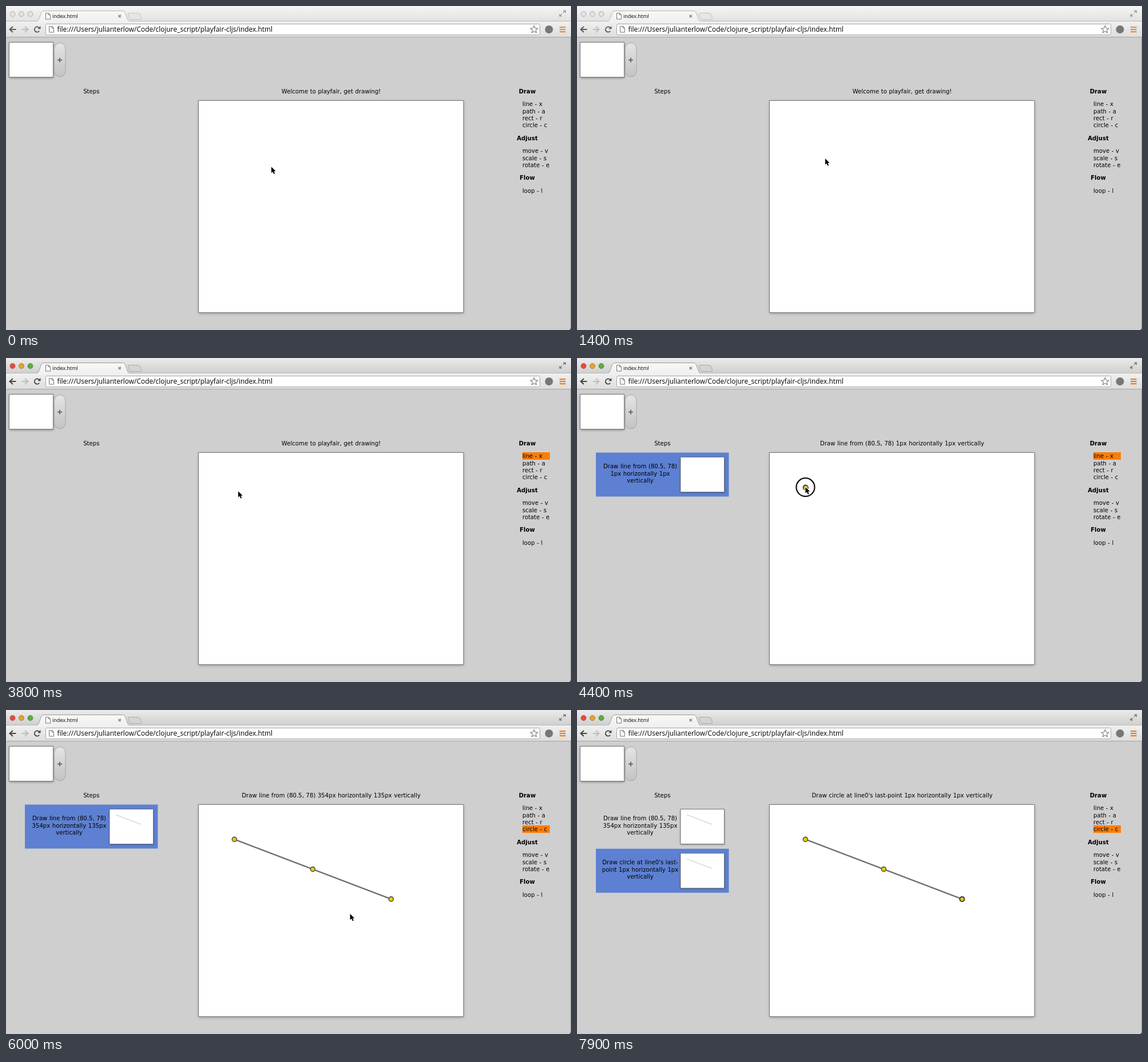
Write an HTML page with a canvas that moves like this. It is 988 by 567 pixels and loops after 8 s.

```html
<!DOCTYPE html>
<html lang="en">
<head>
<meta charset="utf-8">
<title>Drawing tool</title>
<style>
  html, body { margin: 0; width: 100%; height: 100%; overflow: hidden; background: #cfcfcf; }
  canvas { display: block; width: 988px; height: 567px; }
</style>
</head>
<body>
<canvas id="stage" width="988" height="567"></canvas>
<script>
const ctx = document.getElementById('stage').getContext('2d');
const W = 988, H = 567, LOOP = 8000, STEP = 100;
const UI = '"Open Sans", "Noto Sans", sans-serif';
const BODY = '10.15px "DejaVu Sans", sans-serif';

// Event times in ms
const ACTIVATE = 3300, LINE_KEY = 3700, PRESS = 4300, RELEASE = 4900,
      CIRCLE_KEY = 5900, CLICK = 7500, CIRCLE = 7600, CLICK_END = 7800;

const SCALE = 0.774;
const START = [399.4, 226.4];
const SPAN = [354, 135];

// Pointer path: time, x, y
const PATH = [
  [0, 464, 281.5], [100, 468, 260], [300, 468, 176], [400, 470, 182], [600, 464, 272],
  [700, 468.5, 291.5], [800, 480, 265], [1000, 517, 183], [1200, 497, 226],
  [1400, 434, 267], [1500, 411, 238.5], [3500, 411, 238.5], [4200, 399.5, 226],
  [4400, 399.5, 226], [4500, 427, 237], [4600, 523, 274], [4700, 632, 315],
  [4800, 673.4, 331], [5000, 610, 349], [5100, 563, 355], [5300, 559, 360],
  [5500, 584, 360], [5800, 584, 360], [6400, 637, 350], [6600, 666, 331.5],
  [6800, 666, 331.5], [7400, 673, 331]
];

function pointer(t) {
  const i = PATH.findIndex(k => k[0] > t);
  if (i < 0) return PATH[PATH.length - 1].slice(1);
  const [t0, x0, y0] = PATH[i - 1], [t1, x1, y1] = PATH[i];
  const p = (t - t0) / (t1 - t0);
  return [x0 + (x1 - x0) * p, y0 + (y1 - y0) * p];
}

function fade(y0, y1, top, bottom) {
  const g = ctx.createLinearGradient(0, y0, 0, y1);
  g.addColorStop(0, top);
  g.addColorStop(1, bottom);
  return g;
}

function box(x, y, w, h, fill) {
  ctx.fillStyle = fill;
  ctx.fillRect(x, y, w, h);
}

function poly(points, fill, stroke, width = 1, close = true) {
  ctx.beginPath();
  points.forEach(([x, y]) => ctx.lineTo(x, y));
  if (close) ctx.closePath();
  paint(fill, stroke, width);
}

function disc(x, y, r, fill, stroke, width = 1) {
  ctx.beginPath();
  ctx.arc(x, y, r, 0, Math.PI * 2);
  paint(fill, stroke, width);
}

function paint(fill, stroke, width) {
  if (fill) { ctx.fillStyle = fill; ctx.fill(); }
  if (stroke) { ctx.strokeStyle = stroke; ctx.lineWidth = width; ctx.stroke(); }
}

function line(x0, y0, x1, y1, color, width = 1) {
  poly([[x0, y0], [x1, y1]], null, color, width, false);
}

function text(str, x, y, align = 'left', font = BODY) {
  ctx.font = font;
  ctx.wordSpacing = '0.35px';
  ctx.textAlign = align;
  ctx.fillStyle = '#000';
  ctx.fillText(str, x, y);
}

function sheet(x, y, w, h, blur = 3) {
  ctx.save();
  ctx.shadowColor = 'rgba(0,0,0,.4)';
  ctx.shadowBlur = blur;
  ctx.shadowOffsetY = 1;
  box(x, y, w, h, '#fff');
  ctx.restore();
  ctx.strokeStyle = '#777';
  ctx.lineWidth = 1;
  ctx.strokeRect(x, y, w, h);
}

function pageIcon(x, y) {
  poly([[x, y], [x + 5, y], [x + 8, y + 3], [x + 8, y + 10.5], [x, y + 10.5]], '#fafafa', '#777');
  poly([[x + 5, y], [x + 5, y + 3], [x + 8, y + 3]], null, '#777', 1, false);
}

function arrow(x, dir, color) {
  line(x, 41, x + dir * 11, 41, color, 2);
  poly([[x + dir * 5.5, 36], [x, 41], [x + dir * 5.5, 46]], null, color, 2, false);
}

function star(x, y) {
  const pts = Array.from({ length: 10 }, (_, i) => {
    const a = i * Math.PI / 5 - Math.PI / 2, r = i % 2 ? 3.1 : 6.8;
    return [x + r * Math.cos(a), y + r * Math.sin(a)];
  });
  poly(pts, '#fff', '#777', 1.1);
}

function tabStrip(active) {
  box(0, 0, W, 28, active ? fade(0, 27, '#ebebeb', '#cfcfcf') : fade(0, 27, '#f5f5f5', '#e1e1e1'));
  const lights = active ? ['#e8493d', '#e5a62f', '#5caf3e'] : ['#e4e4e4', '#e4e4e4', '#e4e4e4'];
  const rims = active ? ['#a8443c', '#a47c2e', '#4a7c38'] : ['#aaa', '#aaa', '#aaa'];
  lights.forEach((c, i) => disc(11.5 + i * 15.5, 14, 4.4, c, rims[i]));

  poly([[215, 12.5], [231, 12.5], [234, 14], [237, 22], [235, 23.5], [219, 23.5], [216, 21.5], [213, 14]],
    active ? '#d4d4d4' : '#e6e6e6', active ? '#aaa' : '#c2c2c2');

  ctx.beginPath();
  ctx.moveTo(53, 27);
  ctx.bezierCurveTo(60, 26, 59, 8.5, 66, 8.5);
  ctx.lineTo(204, 8.5);
  ctx.bezierCurveTo(211, 8.5, 210, 26, 217, 27);
  paint(fade(8, 27, '#f8f8f8', '#f0f0f0'), active ? '#9b9b9b' : '#b5b5b5', 1);
  pageIcon(69.5, 12.5);
  text('index.html', 81, 21, 'left', '9px ' + UI);
  line(196.5, 15.5, 201, 20, '#777', 1.2);
  line(201, 15.5, 196.5, 20, '#777', 1.2);

  const c = active ? '#777' : '#999';
  line(974, 12, 977, 9, c, 1.3);
  line(972, 14, 969, 17, c, 1.3);
  poly([[974, 7.5], [979, 7.5], [979, 12.5]], c);
  poly([[967.5, 13.5], [967.5, 18.5], [972.5, 18.5]], c);
}

function toolbar(active) {
  const ink = active ? '#444' : '#5c5c5c';
  box(0, 27, W, 28, fade(27, 54, '#f0f0f0', '#dedede'));
  line(0, 26.5, 54, 26.5, '#b9b9b9');
  line(216, 26.5, W, 26.5, '#b9b9b9');
  line(0, 54.5, W, 54.5, '#a2a2a2');
  arrow(6.5, 1, ink);
  arrow(38.5, -1, '#bdbdbd');

  ctx.beginPath();
  ctx.arc(54.5, 41, 4.6, -0.5, -5.6, true);
  paint(null, ink, 1.9);
  poly([[60.5, 35], [60.5, 40.3], [55.3, 40.3]], ink);

  ctx.beginPath();
  ctx.roundRect(69.5, 31.5, 864, 19, 2);
  paint('#fff', '#a5a5a5', 1);
  pageIcon(75.5, 35.5);
  text('file:///Users/julianterlow/Code/clojure_script/playfair-cljs/index.html',
    89.5, 45, 'left', '11.95px ' + UI);
  star(923.5, 41.2);
  disc(949.5, 41, 7, '#777');
  for (let i = 0; i < 3; i++) box(968, 36 + i * 4, 10.5, 2.2, active ? '#f27c14' : '#e88f3a');
}

function plusButton() {
  ctx.beginPath();
  ctx.roundRect(84.5, 64.5, 19.5, 59.5, 10);
  paint(fade(64, 124, '#e4e4e4', '#c3c3c3'), '#a6a6a6', 1);
  line(90, 94.5, 98, 94.5, '#555', 1.6);
  line(94, 90.5, 94, 98.5, '#555', 1.6);
}

function menu(tool) {
  const groups = [
    ['Draw', 152.5, ['line - x', 'path - a', 'rect - r', 'circle - c']],
    ['Adjust', 234.5, ['move - v', 'scale - s', 'rotate - e']],
    ['Flow', 304, ['loop - l']]
  ];
  for (const [head, y, items] of groups) {
    text(head, 911.5, y, 'center', 'bold ' + BODY);
    items.forEach((item, i) => {
      const base = y + 22.7 + i * 12.4;
      if (tool && item.startsWith(tool)) box(903, Math.round(base - 10), 48, 13, '#fa7d05');
      text(item, 903, base);
    });
  }
}

function stepRow(i, rows, selected, size) {
  const y = 165.5 + i * 77.3;
  if (selected) box(33, y, 232.5, 77, '#5d80d2');
  rows.forEach((r, n) => text(r, 110.5, y + 27.6 + n * 12.5, 'center'));
  sheet(181, y + 8, 76.5, 61);
  const x0 = 192, y0 = y + 17.8;
  if (size[0] > 1) line(x0, y0, x0 + size[0] * 0.124, y0 + size[1] * 0.124, '#b4b4b4', 0.8);
}

function dot(p, stroke = '#4d5348', width = 1.6) {
  disc(p[0], p[1], 4, '#e6ce0c', stroke, width);
}

function arrowCursor(x, y) {
  ctx.save();
  ctx.translate(x, y);
  ctx.lineJoin = 'round';
  poly([[0, 0], [0, 10.6], [2.5, 8.4], [4.3, 12.6], [6.2, 11.8], [4.5, 7.8], [7.6, 7.6]], null, '#fff', 2);
  ctx.fillStyle = '#000';
  ctx.fill();
  ctx.restore();
}

function draw(t) {
  const active = t >= ACTIVATE;
  const [px, py] = pointer(t);
  const dragging = t >= PRESS && t < RELEASE;
  const part = t < PRESS ? 0 : dragging ? Math.min(1, Math.max(0, (px - START[0]) / (SPAN[0] * SCALE))) : 1;
  const size = SPAN.map(v => Math.max(1, Math.round(v * part)));
  const at = k => START.map((v, i) => v + size[i] * SCALE * k);
  const tool = t >= LINE_KEY && t < RELEASE ? 'line' : t >= CIRCLE_KEY ? 'circle' : '';

  box(0, 0, W, H, '#cfcfcf');
  tabStrip(active);
  toolbar(active);
  sheet(5.5, 63.5, 77, 61, 4);
  plusButton();
  menu(tool);
  text('Steps', 149.3, 152.7, 'center');
  sheet(336.5, 165.5, 463.5, 371, 5);

  const extent = `${size[0]}px horizontally ${size[1]}px`;
  let title = 'Welcome to playfair, get drawing!';
  if (t >= PRESS) {
    title = `Draw line from (80.5, 78) ${extent} vertically`;
    stepRow(0, ['Draw line from (80.5, 78)', extent, 'vertically'], t < CIRCLE, size);
    if (size[0] > 1) line(...START, ...at(1), '#6e6e6e', 2.2);
  }
  if (t >= CIRCLE) {
    title = "Draw circle at line0's last-point 1px horizontally 1px vertically";
    stepRow(1, ["Draw circle at line0's last-", 'point 1px horizontally 1px', 'vertically'], true, size);
  }
  text(title, 568.6, 152.7, 'center');

  if (dragging || t >= CIRCLE_KEY) [0, 0.5, 1].forEach(k => dot(at(k)));
  if (t >= CIRCLE) dot(at(1), '#3c4540', 2);

  if (dragging || (t >= CLICK && t < CLICK_END)) disc(px, py + 0.2, 16, null, '#111', 2.2);
  if (t < CLICK_END) arrowCursor(px, py);

  line(987.5, 55, 987.5, H, '#a4a4a4');
  poly([[W, H - 3], [W, H], [W - 3, H]], '#444');
}

function tick(now) {
  draw(Math.floor((now % LOOP) / STEP) * STEP);
  requestAnimationFrame(tick);
}
requestAnimationFrame(tick);
</script>
</body>
</html>
```
